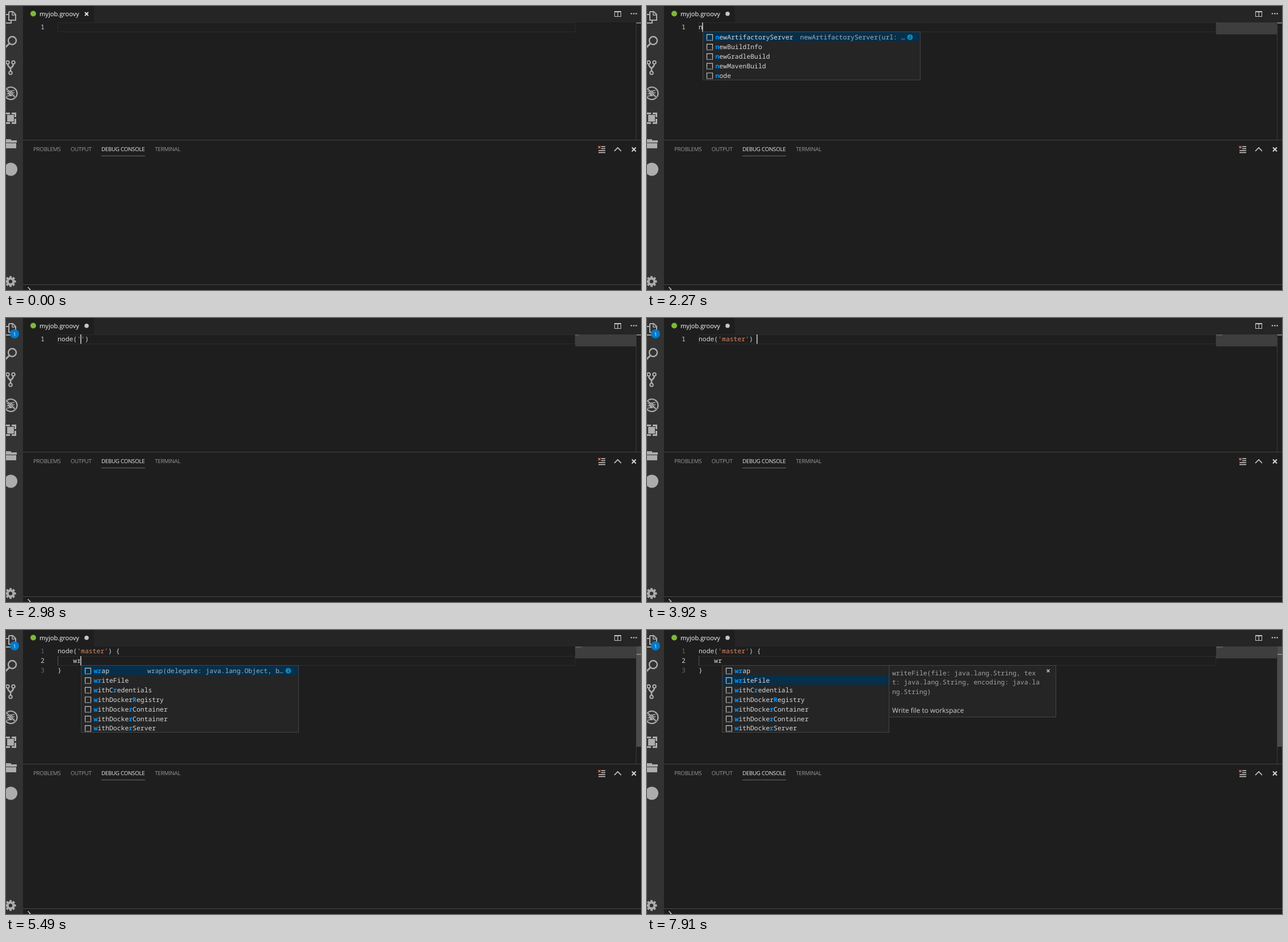
An HTML page with a canvas that plays this animation: 1119 px wide and 501 px high, repeating every 8000 ms.

```html
<!DOCTYPE html>
<html lang="en">
<head>
<meta charset="utf-8">
<title>Editor completion</title>
<style>
html, body { margin: 0; width: 100%; height: 100%; overflow: hidden; background: #1e1e1e; }
canvas { display: block; }
</style>
</head>
<body>
<canvas id="stage" width="1119" height="501"></canvas>
<script>
const ctx = document.getElementById('stage').getContext('2d');
const LOOP = 8000, CH = 6.85, LH = 16.9, LEFT = 91, TOP = 29;
const MONO = '11.42px "Noto Sans Mono", "DejaVu Sans Mono", monospace';
const UI = 'px "Open Sans", "Noto Sans", sans-serif';
const ICON = '#adadad', TEXT = '#d8d8d8', STRING = '#e08a62', BLUE = '#0097fb';
ctx.textRendering = 'geometricPrecision';

// time, text, caret column, matching bracket columns
const edits = [[0, '', 0], [2270, 'n', 1], [2350, 'no', 2], [2430, 'nod', 3],
  [2510, 'node', 4], [2740, 'node()', 5, [4, 5]], [2900, "node('')", 6]];
[3060, 3140, 3300, 3370, 3530, 3610].forEach((t, i) =>
  edits.push([t, "node('" + 'master'.slice(0, i + 1) + "')", 7 + i]));
edits.push([3760, "node('master')", 14, [4, 13]], [3920, "node('master') ", 15],
  [4310, "node('master') {}", 16, [15, 16]], [4390, "node('master') {\n    \n}", 4],
  [5260, "node('master') {\n    w\n}", 5], [5410, "node('master') {\n    wr\n}", 6]);

const caretOff = [[0, 1010], [1490, 2040], [4950, 5260], [5960, 6430], [6890, 7440], [7910, LOOP]];

// each item is a label plus the indices of its matched letters
const item = (label, ...hits) => ({ label, hits });
const first = (...labels) => labels.map(s => item(s, 0));
const wrItems = [item('wrap', 0, 1), item('writeFile', 0, 1), item('withCredentials', 0, 5),
  item('withDockerRegistry', 0, 10), item('withDockerContainer', 0, 9),
  item('withDockerContainer', 0, 9), item('withDockerServer', 0, 9)];
const serverHint = 'newArtifactoryServer(url: …';
const nodeHint = 'node(label: java.lang.String, bo…';
const popups = [
  { t: 2270, col: 1, row: 0, items: first('newArtifactoryServer', 'newBuildInfo', 'newGradleBuild', 'newMavenBuild', 'node'), hint: serverHint },
  { t: 2350, col: 2, row: 0, items: [item('node', 0, 1), item('newBuildInfo', 0, 11), item('newArtifactoryServer', 0, 12)], hint: nodeHint },
  { t: 2430, col: 3, row: 0, items: [item('node', 0, 1, 2)], hint: nodeHint },
  { t: 2510, col: 4, row: 0, items: [item('node', 0, 1, 2, 3)], hint: nodeHint },
  { t: 2740 },
  { t: 5260, col: 5, row: 1, items: first('waitUntil', 'withContext', 'withCredentials', 'withDockerContainer', 'withDockerContainer', 'withDockerRegistry', 'withDockerServer', 'withEnv', 'wrap', 'writeFile', 'ws'), hint: 'waitUntil(body: Closure)' },
  { t: 5490, col: 6, row: 1, items: wrItems, hint: 'wrap(delegate: java.lang.Object, b…' },
  { t: 6190, col: 6, row: 1, items: wrItems, sel: 1, hint: 'writeFile(file: java.lang.String, tex…' },
  { t: 6890, col: 6, row: 1, items: wrItems, sel: 1, docs: true }
];

const pointerPath = [[140, 1030, 490], [500, 476, 250], [700, 560, 128], [860, 882, 160], [1010, 882, 160], [1250, 640, 100]];

function rect(x, y, w, h, color) {
  ctx.fillStyle = color;
  ctx.fillRect(x, y, w, h);
}
function frame(x, y, w, h, color) {
  ctx.strokeStyle = color;
  ctx.lineWidth = 1;
  ctx.strokeRect(x + 0.5, y + 0.5, w - 1, h - 1);
}
function disc(x, y, r, color) {
  ctx.fillStyle = color;
  ctx.beginPath();
  ctx.arc(x, y, r, 0, 7);
  ctx.fill();
}
function ring(x, y, r, width) {
  ctx.strokeStyle = ICON;
  ctx.lineWidth = width;
  ctx.beginPath();
  ctx.arc(x, y, r, 0, 7);
  ctx.stroke();
}
function line(color, width, ...p) {
  ctx.strokeStyle = color;
  ctx.lineWidth = width;
  ctx.beginPath();
  for (let i = 0; i < p.length; i += 2) ctx.lineTo(p[i], p[i + 1]);
  ctx.stroke();
}
function text(s, x, y, color, font = MONO, spacing = 0) {
  ctx.font = font;
  ctx.letterSpacing = spacing + 'px';
  ctx.fillStyle = color;
  ctx.fillText(s, x, y);
}
function cross(x, y, r, color, width) {
  line(color, width, x - r, y - r, x + r, y + r);
  line(color, width, x + r, y - r, x - r, y + r);
}
const latest = (list, t, time) => list.filter(e => time(e) <= t).pop();

function activityBar(t) {
  rect(0, 0, 30, 501, '#333333');
  line(ICON, 2, 0, 15, 5, 15);
  line(ICON, 2, 0, 30, 9, 30, 9, 26);
  line(ICON, 2, 5, 10, 12, 10, 17, 15, 17, 25, 5, 25, 5, 10);
  line(ICON, 1.5, 11, 10, 11, 16, 17, 16);

  ring(11, 61, 7, 2.4);
  line(ICON, 3, 6, 66, -1, 73);

  ring(3, 99.5, 2.8, 2);
  ring(13, 99.5, 2.8, 2);
  ring(8, 118, 2.8, 2);
  line(ICON, 2.6, 3, 102, 4, 106, 8, 110, 8, 115);
  line(ICON, 2.6, 13, 102, 12, 106, 8, 110);

  ring(8.5, 154, 11, 2.2);
  ctx.fillStyle = ICON;
  ctx.beginPath();
  ctx.ellipse(8, 154, 4, 5.5, -0.5, 0, 7);
  ctx.fill();
  for (const y of [150, 154, 158]) line(ICON, 1.3, 1, y + 1, 15, y - 1);
  line('#333333', 3, 1, 146, 17, 162);
  line(ICON, 2, 1, 146, 17, 162);

  line(ICON, 3, -1, 189.5, 7, 189.5);
  line(ICON, 3, 10, 189.5, 16.5, 189.5, 16.5, 196);
  line(ICON, 3, 16.5, 199, 16.5, 206.5, 10, 206.5);
  line(ICON, 3, 7, 206.5, -1, 206.5);
  ctx.strokeStyle = ICON;
  ctx.strokeRect(3.5, 193.5, 9, 9);
  rect(5, 195, 6, 6, ICON);

  rect(0, 235, 9, 4, ICON);
  rect(0, 237, 19, 4, ICON);
  rect(0, 242, 18, 9, ICON);

  disc(8.5, 288, 11.5, ICON);

  for (let i = 0; i < 8; i++) {
    const a = i * Math.PI / 4, c = Math.cos(a), s = Math.sin(a);
    line(ICON, 4, 8 + c * 5, 486 + s * 5, 8 + c * 9.5, 486 + s * 9.5);
  }
  ring(8, 486, 5.2, 4);

  if (t >= 2430) {
    disc(15, 28, 8, '#007acc');
    text('1', 12.6, 31.5, '#fff', '9' + UI);
  }
}

function tabRow(t) {
  rect(30, 0, 1089, 29, '#252526');
  rect(30, 0, 125, 29, '#1e1e1e');
  disc(48, 13.5, 5, '#7cb83a');
  text('myjob.groovy', 59, 17.7, '#fff', '11.1' + UI);
  if (t < 2270) cross(142, 14, 3, '#e8e8e8', 1.8);
  else disc(142, 13.7, 3.8, '#c5c5c5');
  frame(1072, 9, 12, 10, '#c5c5c5');
  rect(1072, 9, 12, 2, '#c5c5c5');
  rect(1077.5, 9, 1.2, 10, '#c5c5c5');
  for (const x of [1102, 1106.3, 1110.6]) disc(x, 13.5, 1.3, '#c5c5c5');
}

function panel() {
  rect(30, 236, 1089, 1, '#474747');
  const tabs = [['PROBLEMS', 48], ['OUTPUT', 113.7], ['DEBUG CONSOLE', 168], ['TERMINAL', 262.5]];
  for (const [s, x] of tabs)
    text(s, x, 256.4, x === 168 ? '#e7e7e7' : '#969696', '9.8' + UI, -0.3);
  rect(168, 264, 77, 1, '#6c6c6c');

  for (let i = 0; i < 4; i++) rect(i < 2 ? 1049 : 1044, 247.3 + i * 3.5, i < 2 ? 7 : 12, 1.5, '#d0d0d0');
  cross(1045.5, 249, 2, '#f0705f', 1.4);
  line('#d0d0d0', 1.6, 1072, 256, 1078, 250, 1084, 256);
  cross(1106.5, 253, 3.5, '#d8d8d8', 2);

  rect(30, 491, 1089, 1, '#474747');
  line('#c5c5c5', 1.6, 38.5, 496, 42.5, 500, 38.5, 504);
}

function code(s, x, y) {
  const parts = s.split(/('[^']*')/);
  for (const p of parts) {
    text(p, x, y, p[0] === "'" ? STRING : TEXT);
    x += p.length * CH;
  }
}

function editor(t) {
  const [, body, col, pair] = latest(edits, t, e => e[0]);
  const lines = body.split('\n'), row = lines.length > 1 ? 1 : 0;
  const top = Math.round(TOP + row * LH);

  frame(LEFT, top, 912, 17, '#2c2c2c');
  if (row) rect(LEFT, 46, 1, 17, '#555555');
  if (pair) for (const c of pair) {
    rect(LEFT + c * CH, TOP, CH, 16, 'rgba(0,100,0,.1)');
    frame(Math.round(LEFT + c * CH), TOP, 7, 16, '#7a7a7a');
  }
  lines.forEach((s, i) => {
    const y = 41 + i * LH;
    text(String(i + 1), 61, y, i === row ? '#d0d0d0' : '#6a6a6a');
    code(s, LEFT, y);
  });
  if (!caretOff.some(([a, b]) => t >= a && t < b))
    rect(Math.floor(LEFT + 6.8 * col), top, 1.7, 16.5, '#c0c0c0');

  const shown = Math.min(1, Math.max(0, (t - 1010) / 240));
  rect(1003, 29, 108, 21, `rgba(121,121,121,${0.36 * shown})`);
  lines.forEach((s, i) => {
    [...s].forEach((c, k) => {
      if (c !== ' ') rect(1003 + k * 0.8, 29.5 + i * 1.7, 0.7, 1, 'rgba(190,190,190,.5)');
    });
  });
  rect(1110, 29, 1, 207, '#3c3c3c');
  if (row) rect(1111, 29, 8, 177, '#4b4b4b');
  rect(1111, row ? 42 : 29, 8, 1.7, '#8c8c8c');
}

function box(x, y, w, h) {
  rect(x, y, w, h, '#252526');
  frame(x, y, w, h, '#454545');
}

function itemIcon(x, y) {
  line('#c5c5c5', 1.2, x, y + 9, x, y, x + 10, y, x + 10, y + 9);
  for (let i = 0; i < 4; i++) rect(x - 0.5 + i * 3, y + 9.5, 2, 1.3, '#c5c5c5');
}

function popup(t) {
  const p = latest(popups, t, e => e.t);
  if (!p || !p.items) return;
  const x = Math.round(LEFT + p.col * CH), y = TOP + LH * (p.row + 1);
  const top = Math.floor(y), w = p.docs ? 295 : 384, h = Math.round(p.items.length * LH) + 1;
  const sel = p.sel || 0;

  box(x, top, w, h);
  ctx.save();
  ctx.beginPath();
  ctx.rect(x + 1, top + 1, w - 2, h - 2);
  ctx.clip();
  rect(x + 1, y + sel * LH, w - 2, LH, '#062f4a');
  p.items.forEach(({ label, hits }, i) => {
    const base = y + 13.2 + i * LH;
    itemIcon(x + 7.5, base - 8.7);
    [...label].forEach((c, k) => {
      const hit = hits.includes(k);
      text(c, x + 22.6 + k * CH, base, hit ? BLUE : TEXT, (hit ? 'bold ' : '') + MONO);
    });
  });
  if (p.hint) {
    const base = y + 13.2 + sel * LH;
    text(p.hint, x + 356.8 - p.hint.length * CH, base, '#a2aeb6');
    disc(x + 365.5, base - 4, 5, '#0e86b5');
    rect(x + 365, base - 4.7, 1.2, 3.6, '#0a2f45');
    rect(x + 365, base - 7, 1.2, 1.2, '#0a2f45');
  }
  ctx.restore();

  if (p.docs) docs(x + w - 1, top);
}

function docs(x, y) {
  box(x, y, 295, 92);
  ['writeFile(file: java.lang.String, tex', 't: java.lang.String, encoding: java.la', 'ng.String)']
    .forEach((s, i) => text(s, x + 6, y + 17.5 + i * LH, '#a3a3a3'));
  cross(x + 281, y + 10, 2.5, '#c5c5c5', 1.5);
  text('Write file to workspace', x + 6, y + 83.5, '#d0d0d0', '11.9' + UI);
}

function pointer(t) {
  if (t < 140 || t >= 1250) return;
  const s = 140 + Math.floor((t - 140) / 80) * 80;
  const i = Math.max(1, pointerPath.findIndex(p => p[0] > s));
  const [t0, x0, y0] = pointerPath[i - 1], [t1, x1, y1] = pointerPath[i];
  const k = (s - t0) / (t1 - t0), x = x0 + (x1 - x0) * k, y = y0 + (y1 - y0) * k;
  if (y < 236) {
    line('#d0d0d0', 1, x, y, x + 6, y);
    line('#d0d0d0', 1, x + 3, y, x + 3, y + 16);
    line('#d0d0d0', 1, x, y + 16, x + 6, y + 16);
    return;
  }
  ctx.fillStyle = '#fff';
  ctx.beginPath();
  ctx.moveTo(x, y);
  ctx.lineTo(x, y + 15);
  ctx.lineTo(x + 4, y + 11.5);
  ctx.lineTo(x + 10, y + 10.5);
  ctx.fill();
}

function draw() {
  const t = performance.now() % LOOP;
  rect(0, 0, 1119, 501, '#1e1e1e');
  activityBar(t);
  tabRow(t);
  editor(t);
  panel();
  popup(t);
  pointer(t);
  requestAnimationFrame(draw);
}
draw();
</script>
</body>
</html>
```
